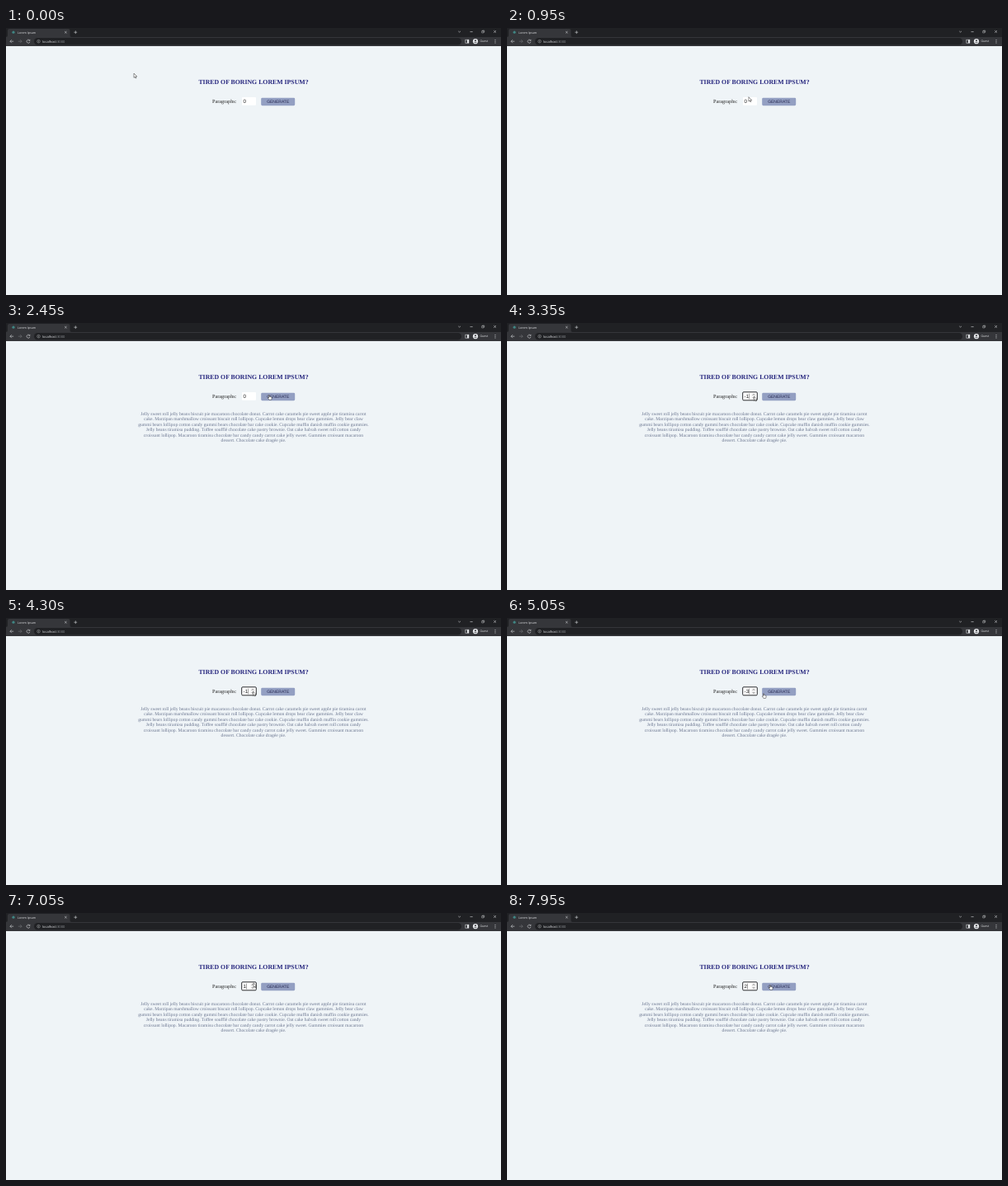
An HTML page for the animation above (8 s loop, 600 by 324 pixels).

```html
<!DOCTYPE html>
<html lang="en">
<head>
<meta charset="utf-8">
<title>Lorem Ipsum</title>
<style>
  html, body { margin: 0; width: 100%; height: 100%; overflow: hidden; background: #eff4f7; }
  svg { display: block; width: 100vw; height: 100vh; }
  text { text-rendering: geometricPrecision; }
  .ui { font-family: "Open Sans", "Noto Sans", sans-serif; font-size: 3.6px; fill: #e4e6e9; }
  .icon { fill: none; stroke: #d5d7da; stroke-width: .6; }
  .serif { font-family: "Liberation Serif", "Times New Roman", serif; }
  .sans { font-family: "Liberation Sans", Arial, sans-serif; }
  .copy { font-size: 5.625px; fill: #6b7690; text-anchor: middle; }
  .pointer { fill: #fff; stroke: #111; stroke-width: .45; stroke-linejoin: round; }
</style>
</head>
<body>
<svg viewBox="0 0 600 324">
  <rect width="600" height="324" fill="#eff4f7"/>

  <g id="browser">
    <rect width="600" height="11" fill="#202124"/>
    <path d="M0 11Q2 11 2 9V3Q2 1 4 1H75.5Q77.5 1 77.5 3V9Q77.5 11 79.5 11Z" fill="#35363a"/>
    <rect y="11" width="600" height="11" fill="#35363a"/>
    <rect x="34" y="12" width="518" height="8.5" rx="4.25" fill="#202124"/>
    <circle cx="9" cy="5.2" r="1.6" fill="#3f8583"/>
    <text class="ui" x="14" y="6.6">Lorem Ipsum</text>
    <text class="ui" x="44" y="17.7" style="font-size:4.05px">localhost<tspan fill="#969a9f">:3000</tspan></text>
    <text class="ui" x="574.5" y="17.4">Guest</text>
    <g class="icon">
      <path d="M71.2 4l2.4 2.4m0-2.4l-2.4 2.4M82.4 5.2h3.8m-1.9-1.9v3.8"/>
      <path d="M9.2 16.2H4.9m2-2l-2 2 2 2"/>
      <path d="M14.8 16.2h4.3m-2-2l2 2-2 2" stroke="#77797d"/>
      <path d="M28.5 14.8A2 2 0 1 0 29 16.8M28.9 13.9v1.5h-1.5"/>
      <circle cx="39.5" cy="16.2" r="1.8" stroke-width=".4"/>
      <path d="M39.5 15.9v1.3m0-2.2v.4" stroke-width=".45"/>
      <path d="M548.2 3.8l1.4 1.3 1.4-1.3M562.5 4.6h3.2M591.2 3l2.8 2.8m0-2.8l-2.8 2.8"/>
      <path d="M576.7 3.7h2.2v2.2h-2.2zM577.4 3.7v-.7h2.3v2.2h-.8" stroke-width=".45"/>
      <rect x="556.9" y="14.2" width="4" height="4"/>
    </g>
    <g fill="#e4e6e9">
      <rect x="559" y="14.2" width="2" height="4"/>
      <circle cx="569" cy="16.2" r="3.1"/>
      <circle cx="593" cy="14.5" r=".5"/>
      <circle cx="593" cy="16.2" r=".5"/>
      <circle cx="593" cy="17.9" r=".5"/>
    </g>
    <circle cx="569" cy="15.3" r="1" fill="#35363a"/>
    <path d="M567 18a2.3 1.5 0 0 1 4 0z" fill="#35363a"/>
  </g>

  <text class="serif" x="300" y="67.9" text-anchor="middle" font-size="7.8125" font-weight="bold" fill="#26267e">TIRED OF BORING LOREM IPSUM?</text>
  <text class="serif" x="250" y="91.1" font-size="6.25" fill="#222">Paragraphs:</text>

  <rect x="286" y="84" width="17" height="9.8" rx=".8" fill="#fff"/>
  <text id="value" class="sans" x="287.6" y="91.2" font-size="6.25" fill="#222">0</text>
  <g id="spinner">
    <rect x="296.6" y="85.4" width="4.8" height="7" fill="#f1f1f1"/>
    <path d="M297.9 87.6l1.1-1.2 1.1 1.2m0 2.6l-1.1 1.2-1.1-1.2" fill="none" stroke="#4a4a4a" stroke-width=".7"/>
  </g>
  <g id="focus">
    <rect x="285.7" y="83.8" width="17.6" height="10" rx="1.1" fill="none" stroke="#17171a" stroke-width=".9"/>
    <rect id="caret" y="85.6" width=".4" height="6.8" fill="#111"/>
  </g>

  <rect x="309.2" y="84.7" width="41" height="9.5" rx="1.4" fill="#939fc2"/>
  <text class="sans" x="329.7" y="91.1" text-anchor="middle" font-size="5" fill="#25284f">GENERATE</text>

  <g id="copy" class="serif copy"></g>

  <g id="cursor" class="pointer">
    <path id="arrow" d="M0 0V5.3L1.25 4.2 2.05 6 2.9 5.6 2.1 3.9H3.8Z"/>
    <path id="hand" d="M-.5 .4Q0-.3 .5 .4V2.3Q1.1 1.9 1.4 2.4 2 2.1 2.3 2.6 3 2.4 3.1 3.1V4.4Q3 5.2 2.6 6H-.1Q-.6 5-1.6 3.9-1.8 3.1-1.1 3.2L-.5 3.7Z"/>
  </g>
</svg>
<script>
const DURATION = 8000;
const TEXT_AT = 2300;
const lines = [
  "Jelly sweet roll jelly beans biscuit pie macaroon chocolate donut. Carrot cake caramels pie sweet apple pie tiramisu carrot",
  "cake. Marzipan marshmallow croissant biscuit roll lollipop. Cupcake lemon drops bear claw gummies. Jelly bear claw",
  "gummi bears lollipop cotton candy gummi bears chocolate bar cake cookie. Cupcake muffin danish muffin cookie gummies.",
  "Jelly beans tiramisu pudding. Toffee soufflé chocolate cake pastry brownie. Oat cake halvah sweet roll cotton candy",
  "croissant lollipop. Macaroon tiramisu chocolate bar candy candy carrot cake jelly sweet. Gummies croissant macaroon",
  "dessert. Chocolate cake dragée pie."
];

// time, x, y of the pointer tip
const path = [
  [0, 155, 55], [150, 155, 55], [850, 290, 82], [1100, 298.2, 86.8], [1850, 298.2, 86.8],
  [2150, 319, 87.2], [2800, 319, 87.2], [3150, 299.5, 89], [4800, 299.5, 89],
  [5050, 311, 91.4], [5300, 319, 88], [5750, 319, 88], [6100, 300, 84.8],
  [7500, 300, 84.8], [7800, 319, 87.2], [DURATION, 319, 87.2]
];
const values = [
  [0, "0"], [3250, "-1"], [4500, "-2"], [4720, "-3"], [6350, "-2"],
  [6600, "-1"], [6850, "0"], [7050, "1"], [7250, "2"]
];
const focusSteps = [[0, false], [3250, true], [5350, false], [6350, true]];

const $ = id => document.getElementById(id);
const show = (id, on) => $(id).setAttribute("visibility", on ? "visible" : "hidden");
const stepAt = (steps, t) => steps.filter(([start]) => start <= t).pop()[1];

function pointAt(t) {
  const i = path.findIndex(([time]) => time > t);
  const [t0, x0, y0] = path[i - 1];
  const [t1, x1, y1] = path[i];
  const p = (t - t0) / (t1 - t0);
  const ease = p * p * (3 - 2 * p);
  return [x0 + (x1 - x0) * ease, y0 + (y1 - y0) * ease];
}

$("copy").innerHTML = lines
  .map((line, i) => `<text x="300" y="${111.7 + i * 6.46}">${line}</text>`)
  .join("");

function draw() {
  const t = performance.now() % DURATION;
  const [x, y] = pointAt(t);
  const value = stepAt(values, t);
  const focused = stepAt(focusSteps, t);
  const overField = x > 286 && x < 303 && y > 84 && y < 94;
  const overButton = x > 309 && y > 84;

  $("value").textContent = value;
  $("caret").setAttribute("x", value.length > 1 ? 293.3 : 291.1);
  show("focus", focused);
  show("spinner", focused || overField);
  show("copy", t >= TEXT_AT);
  show("arrow", !overButton);
  show("hand", overButton);
  $("cursor").setAttribute("transform", `translate(${x} ${y})`);
  requestAnimationFrame(draw);
}
draw();
</script>
</body>
</html>
```
